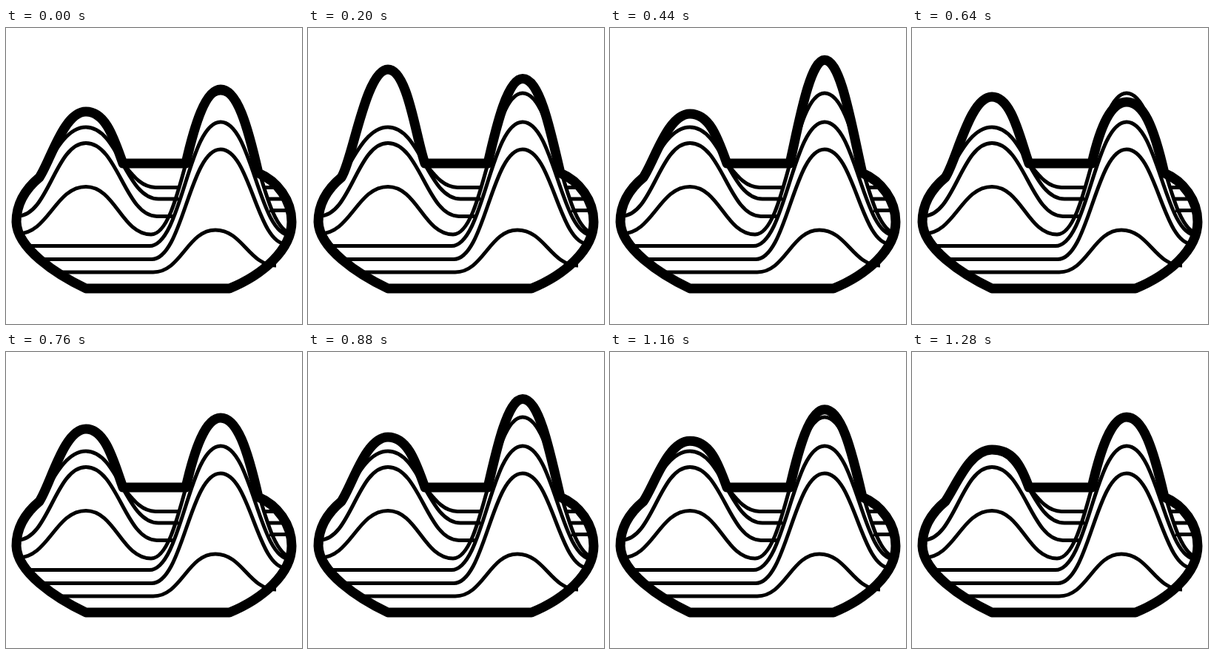
Animation of 400 by 400 pixels, one loop 1.56 s. Source, as an HTML page:

```html
<!DOCTYPE html>
<html lang="en">
<head>
<meta charset="utf-8">
<title>Ridges</title>
<style>
html, body { margin: 0; width: 100%; height: 100%; overflow: hidden; background: #fff; }
svg { display: block; width: 100vw; height: 100vh; }
path { fill: none; stroke: #000; stroke-linejoin: round; }
#ridges { stroke-width: 5; }
#rim { stroke-width: 13; }
</style>
</head>
<body>
<svg viewBox="0 0 400 400">
  <path id="ridges"/>
  <path id="rim"/>
</svg>
<script>
const LOOP = 1560, STEP = 40, REST = 1280;
const LEFT = 108, RIGHT = 290;
const rim = document.getElementById('rim');

// S-curve between two level points
const slope = (x0, y0, x1, y1) => {
  const reach = (x1 - x0) * 0.45;
  return `C${x0 + reach} ${y0} ${x1 - reach} ${y1} ${x1} ${y1}`;
};

const hill = (x0, y0, x, y, x1, y1) =>
  `M${x0} ${y0}` + slope(x0, y0, x, y) + slope(x, y, x1, y1);

// Steep flank shared by the rim and the highest left ridge
const leftRise = y => `C60 180 78 ${y} ${LEFT} ${y}`;

function ridges() {
  let d = 'M45 202' + leftRise(134) + slope(LEFT, 134, 206, 231) + 'H233';
  d += 'M159 184C172 200 183 215 202 215.5H236';
  d += hill(16, 254, LEFT, 155.5, 204, 254.5) + 'H228';
  d += hill(16, 278, LEFT, 214.5, 196, 279) + slope(196, 279, RIGHT, 88) + slope(RIGHT, 88, 388, 278);
  // Three front ridges, each with a level run-in from the left
  d += 'M27 294.5H' + hill(194, 294.5, RIGHT, 127, 384, 280).slice(1).replace(' ', 'V');
  d += 'M40 312.5H' + hill(197, 312.5, RIGHT, 164, 379, 292).slice(1).replace(' ', 'V');
  d += 'M66 330H' + hill(199, 330, 283, 273, 365, 321).slice(1).replace(' ', 'V');
  for (let i = 0; i < 3; i++) d += `M${348 + 4 * i} ${215.5 + 15.5 * i}h${18 + 5 * i}`;
  return d;
}

function outline(l, r) {
  return 'M108 352C68 333 15 298 14 262C14 236 27 217 45 202' + leftRise(l) +
    `C135 ${l} 146 150 158 183H243` +
    `C255 130 270 ${r} ${RIGHT} ${r}C312 ${r} 326 130 341 196` +
    'C367 207 386 233 386 262C386 300 346 334 302 352Z';
}

// Summits swing between a few [time, height] turning points
const leftSwing = [[0, 113], [200, 56], [440, 116], [640, 93], [880, 115], [1080, 114], [REST, 132]];
const rightSwing = [[0, 83], [80, 93], [360, 30], [640, 100], [1080, 36], [1120, 76], [REST, 88]];

function swing(keys, t) {
  const i = Math.max(1, keys.findIndex(k => k[0] >= t));
  const [t0, a] = keys[i - 1], [t1, b] = keys[i];
  return a + (b - a) * (1 - Math.cos(Math.PI * (t - t0) / (t1 - t0))) / 2;
}

function draw() {
  const t = Math.min(REST, Math.floor((performance.now() - start) % LOOP / STEP) * STEP);
  rim.setAttribute('d', outline(swing(leftSwing, t), swing(rightSwing, t)));
  requestAnimationFrame(draw);
}

document.getElementById('ridges').setAttribute('d', ridges());
const start = performance.now();
draw();
</script>
</body>
</html>
```
